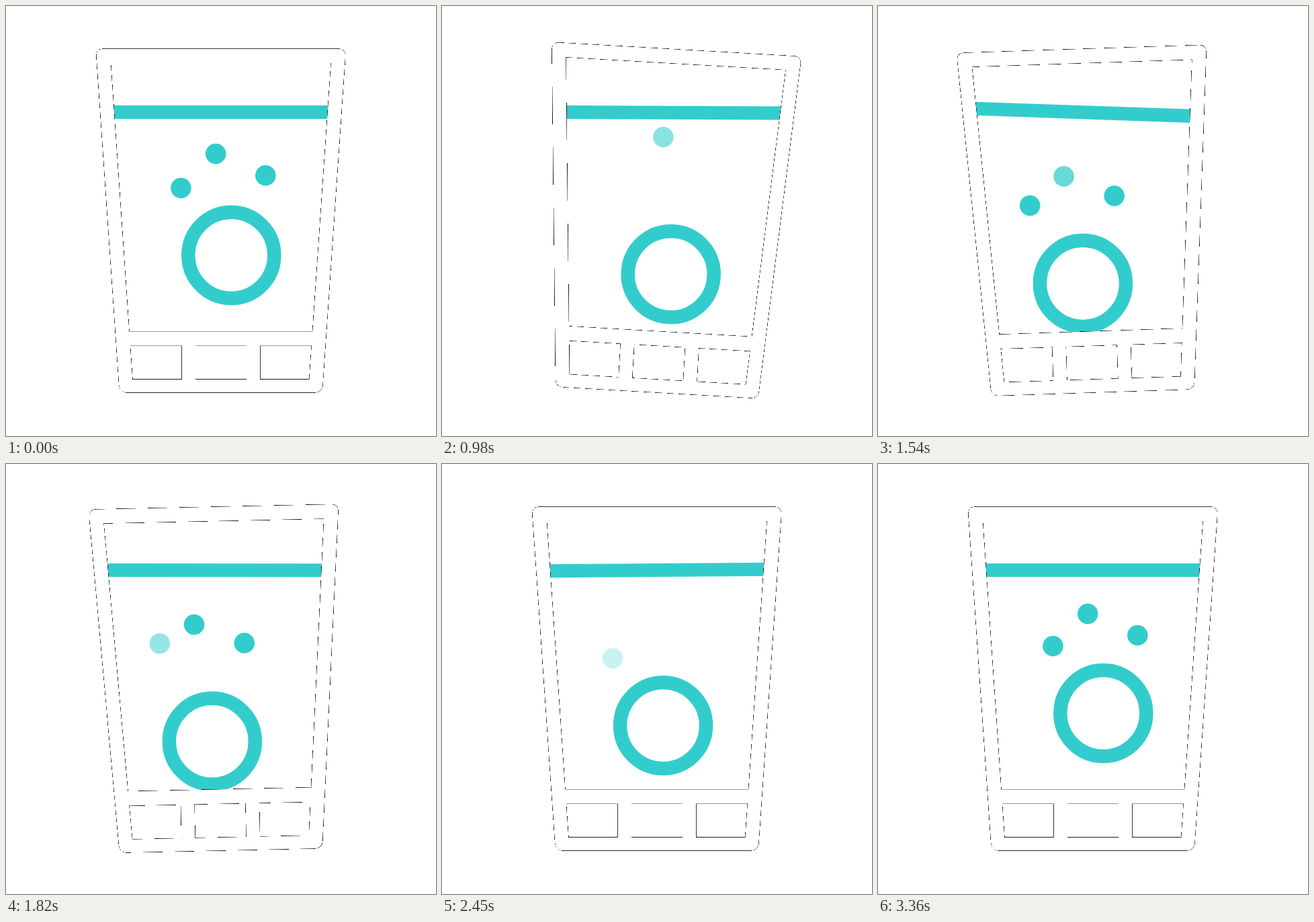
Recreate the animation shown at these times as an HTML page with a canvas. Size 640x640 px, loop 3430 ms.

```html
<!DOCTYPE html>
<html lang="en">
<head>
<meta charset="utf-8">
<title>Fizzing glass</title>
<style>
html, body { margin: 0; width: 100%; height: 100%; overflow: hidden; background: #fff; }
canvas { display: block; width: 640px; height: 640px; }
</style>
</head>
<body>
<canvas id="stage" width="640" height="640"></canvas>
<script>
const ctx = document.getElementById('stage').getContext('2d');
const LOOP = 3430, STEP = 70, TEAL = '#33cccc';
const CX = 319.8, BASE = 575.15;
const RAD = Math.PI / 180;

const clamp = v => Math.max(0, Math.min(1, v));

// Moves from value to value between key times with a cosine ease
function track(keys, t) {
  let value = keys[0][1];
  for (let i = 1; i < keys.length; i++) {
    const [t0, v0] = keys[i - 1], [t1, v1] = keys[i];
    value += (v1 - v0) * (1 - Math.cos(Math.PI * clamp((t - t0) / (t1 - t0)))) / 2;
  }
  return value;
}

const TILT = [[70, 0], [800, 4], [1610, -2], [2100, 0]];
const LEVEL = [[800, 0], [1550, 2], [2100, -2], [2600, 0]];
const SHIFT_X = [[770, 0], [1500, -25], [1850, -25], [2750, 0]];
const SHIFT_Y = [[300, 0], [1430, 41.6], [2100, 41.6], [2750, 0]];

// Two rounds of bubbles; the first round appears before the loop wraps
const SHOW = [-1050, 1190];
const BUBBLES = [
  { x: 260.4, home: 271, reach: 57.5, rate: .0217, launch: [0, 1218] },
  { x: 386.3, home: 262, reach: 71.5, rate: .013, launch: [-350, 977] },
  { x: 312.2, home: 246, reach: 89.5, rate: .0097, launch: [-905, 433] }
];

// The glass narrows evenly; every outline follows the same slope
const half = y => 164.05 - .0688 * (y - 84.68);

function panel(top, bottom, left, right) {
  return [[CX + left(top), top], [CX + left(bottom), bottom],
          [CX + right(bottom), bottom], [CX + right(top), top]];
}

// Outlines run so that the glass wall lies to the right of travel
const leftWall = y => -half(y);
const INNER = panel(84.68, 484.4, leftWall, half);
const BOXES = [[leftWall, () => -58], [() => -38, () => 38.4], [() => 58.4, half]]
  .map(sides => panel(505.6, 555.9, ...sides));
const OUTER = roundCorners(
  panel(63.8, BASE, y => -half(y) - 20.4, y => half(y) + 20.4).reverse(), 11.5);

function roundCorners(points, cut) {
  const n = points.length, out = [];
  points.forEach((p, i) => {
    const toward = q => {
      const k = cut / Math.hypot(q[0] - p[0], q[1] - p[1]);
      return [p[0] + (q[0] - p[0]) * k, p[1] + (q[1] - p[1]) * k];
    };
    const a = toward(points[(i + n - 1) % n]), b = toward(points[(i + 1) % n]);
    for (let s = 0; s <= 8; s++) {
      const u = s / 8, w = 1 - u;
      out.push([0, 1].map(c => w * w * a[c] + 2 * u * w * p[c] + u * u * b[c]));
    }
  });
  return out;
}

// Dark fringe: only border pixels thinly covered by the white wall show
function fringe(a, b) {
  const dx = b[0] - a[0], dy = b[1] - a[1];
  const steep = Math.abs(dy) > Math.abs(dx);
  const m = steep ? 1 : 0, n = 1 - m;
  const wallAfter = steep ? dy < 0 : dx > 0;
  const lo = Math.min(a[m], b[m]), hi = Math.max(a[m], b[m]);
  for (let i = Math.ceil(lo - .5); i + .5 < hi; i++) {
    const v = a[n] + (i + .5 - a[m]) * (b[n] - a[n]) / (b[m] - a[m]);
    const cell = Math.floor(v), part = v - cell;
    const cover = wallAfter ? 1 - part : part;
    if (cover > .62) continue;
    const shade = Math.round(255 * cover);
    ctx.fillStyle = `rgb(${shade},${shade},${shade})`;
    if (steep) ctx.fillRect(cell, i, 1, 1);
    else ctx.fillRect(i, cell, 1, 1);
  }
}

function outline(points, place) {
  const placed = points.map(place);
  placed.forEach((p, i) => fringe(p, placed[(i + 1) % placed.length]));
}

function disc(x, y, r) {
  ctx.beginPath();
  ctx.arc(x, y, r, 0, 2 * Math.PI);
}

function drawBubbles(t) {
  const now = t < LOOP + SHOW[0] ? t : t - LOOP;
  BUBBLES.forEach((b, i) => b.launch.forEach((launch, round) => {
    const rise = Math.pow(b.rate * Math.max(0, now - launch), 1.5);
    const appear = (now - SHOW[round] - i * STEP) / 280;
    ctx.globalAlpha = clamp(Math.min(appear, (b.reach - rise) / 20));
    disc(b.x, b.home - rise, 15.3);
    ctx.fill();
  }));
}

function drawContents(t, tilt) {
  ctx.save();
  ctx.translate(CX, BASE);
  ctx.rotate(tilt);
  ctx.translate(-CX, -BASE);
  ctx.beginPath();
  INNER.forEach(p => ctx.lineTo(...p));
  ctx.clip();
  ctx.fillStyle = ctx.strokeStyle = TEAL;

  ctx.save();
  ctx.translate(CX, 158);
  ctx.rotate(track(LEVEL, t) * RAD - tilt);
  ctx.fillRect(-200, -10, 400, 20);
  ctx.restore();

  ctx.translate(track(SHIFT_X, t), track(SHIFT_Y, t));
  ctx.lineWidth = 20.5;
  disc(335.3, 371, 64);
  ctx.stroke();
  drawBubbles(t);
  ctx.restore();
}

function draw(t) {
  ctx.fillStyle = '#fff';
  ctx.fillRect(0, 0, 640, 640);
  const tilt = track(TILT, t) * RAD;
  const c = Math.cos(tilt), s = Math.sin(tilt);
  const place = ([x, y]) => {
    const dx = x - CX, dy = y - BASE;
    return [CX + dx * c - dy * s, BASE + dx * s + dy * c];
  };
  drawContents(t, tilt);
  [OUTER, INNER, ...BOXES].forEach(shape => outline(shape, place));
}

const start = performance.now();
function frame() {
  const t = (performance.now() - start) % LOOP;
  draw(Math.floor(t / STEP) * STEP);
  requestAnimationFrame(frame);
}
frame();
</script>
</body>
</html>
```
